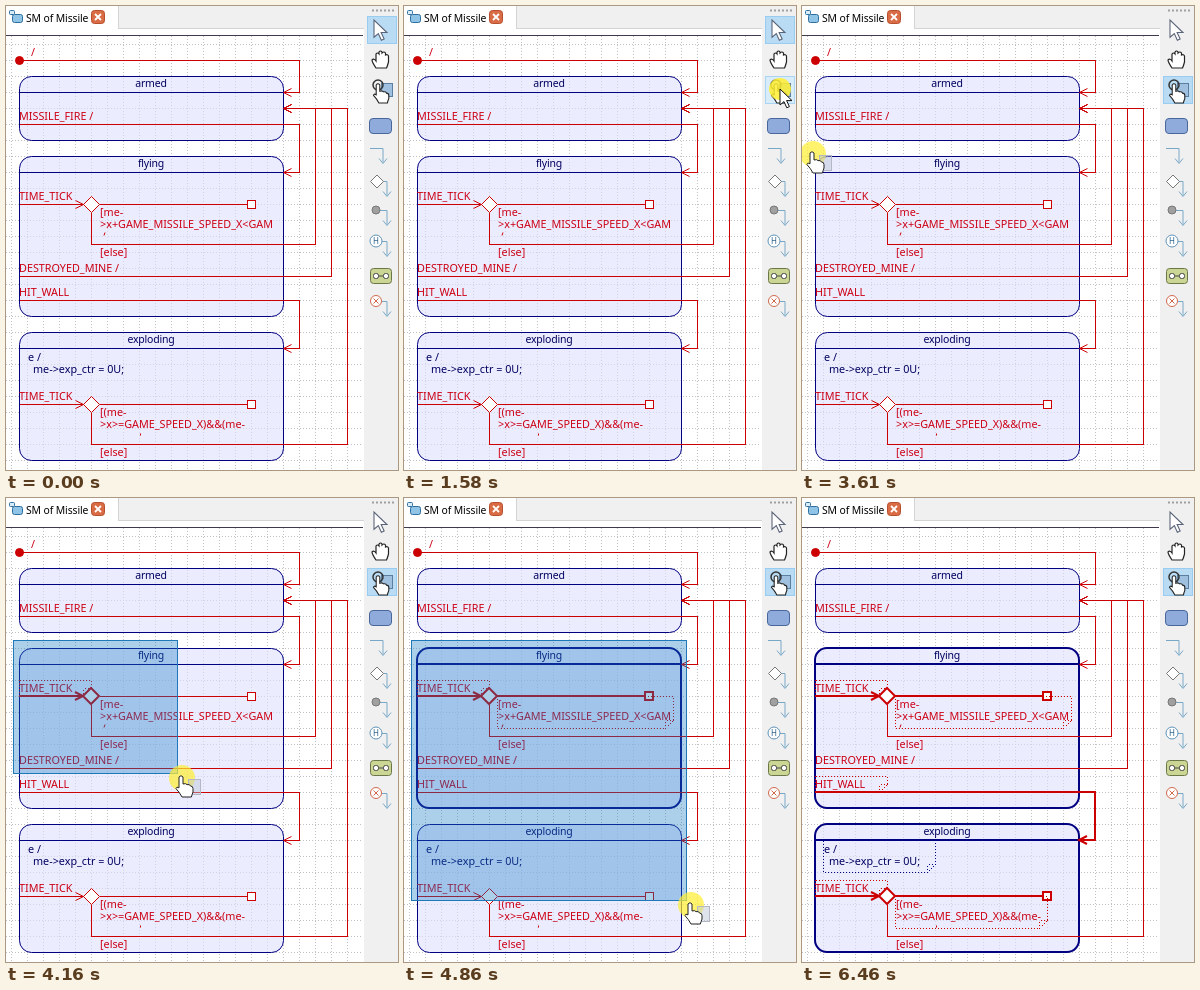
Animation, 392 px wide and 464 px high, one loop 7450 ms. Source, as an HTML page:

```html
<!DOCTYPE html>
<html lang="en">
<head>
<meta charset="utf-8">
<title>State machine selection</title>
<style>
html, body { margin: 0; width: 100%; height: 100%; overflow: hidden; background: #fff; }
svg { display: block; }
text { font: 10.8px "Noto Sans", "Open Sans", sans-serif; stroke: none; white-space: pre; }
.red { stroke: #cc0000; fill: none; }
.red text { fill: #cc0014; }
.navy { stroke: #000080; fill: none; }
.navy text { fill: #000060; }
.name { font-size: 10.5px; letter-spacing: -.2px; text-anchor: middle; }
.title { font-size: 10.4px; letter-spacing: -.1px; }
.line { shape-rendering: crispEdges; }
.box { visibility: hidden; stroke-width: 1; stroke-dasharray: 1 2; shape-rendering: crispEdges; }
.sel { stroke-width: 2; }
.sel > :not(text):not(.box) { transform: translate(-.5px, -.5px); }
.sel .box { visibility: visible; }
.button { fill: none; stroke: none; }
.button.hover { fill: #d8ecf9; stroke: #a9d4f2; }
.button.on { fill: #b9dcf4; stroke: #98ccf0; }
</style>
</head>
<body>
<svg id="stage" width="392" height="464" viewBox="0 0 392 464"></svg>
<script>
const LOOP = 7450;
const MARQUEE = { x: 7, y: 142 };
const BUTTON_Y = [24, 54, 84, 119, 150, 180, 209, 238, 270, 299];
const HAND = "M-2 0q2-2.6 4 0v7q3-1 4 .6q3-.6 3.4 1.4q2.6 0 2.6 2.6v3.4q-1 2.6-1.6 5h-9.4q-2.4-4.6-6-8.4q.4-2.4 3-.8z";
const ARROW = "M0 0V16L4 12.6L6.8 18.8L9.4 17.6L6.6 11.6H12Z";

const clamp = (v, lo, hi) => Math.max(lo, Math.min(hi, v));
const mix = (a, b, p) => a + (b - a) * p;
const text = (x, y, s, cls = "") =>
  `<text x="${x - .5}" y="${y - 1}" class="${cls}">${s.replace(/&/g, "&amp;").replace(/</g, "&lt;")}</text>`;
const path = (d, cls = "") => `<path d="${d}" class="${cls}"/>`;

// dotted frame with a folded corner, shown around the text of a selected part
const note = (x, y, w, h) =>
  path(`M${x} ${y}h${w}v${h - 8}l-8 8H${x}zm${w - 8} ${h}v-8h8`, "box");

// top, right and bottom are the edges the marquee must enclose to select the part
const part = (cls, top, right, bottom, body) =>
  `<g class="${cls}" data-top="${top}" data-right="${right}" data-bottom="${bottom}">${body}</g>`;

const headLeft = (x, y) => path(`M${x + 8} ${y - 4}L${x} ${y}L${x + 8} ${y + 4}`);
const headRight = (x, y) => path(`M${x - 8} ${y - 4}L${x} ${y}L${x - 8} ${y + 4}`);

function state(y, h, name, extra = "") {
  return part("navy", y, 277, y + h,
    `<rect x="13" y="${y}" width="264" height="${h}" rx="12" fill="#e0e0ff" fill-opacity=".6"/>` +
    path(`M13 ${y + 16}H277`, "line") + text(145, y + 11, name, "name") + extra);
}

// a line from the left edge out to a column, then into a state
function transition(y, column, target, name, extra = "") {
  return part("red", Math.min(y, target), column, Math.max(y, target),
    path(`M13 ${y}H${column}V${target}H277`, "line") + headLeft(277, target) +
    text(13, y - 4, name) + extra);
}

function tick(y, column, guard, guardWidth) {
  return part("red", 102, column, y + 40,
      path(`M85 ${y + 8}V${y + 40}H${column}V102H277`, "line") + headLeft(277, 102) +
      text(94, y + 52, "[else]")) +
    part("red", y, 85, y + 10, path(`M13 ${y}H77`, "line") + headRight(77, y) +
      text(13, y - 4, "TIME_TICK") + note(13, y - 16, 72, 16)) +
    part("red", y, 93 + guardWidth, y + 32, path(`M93 ${y}H241`, "line") +
      `<rect x="241" y="${y - 4}" width="8" height="8" fill="#fff" class="line"/>` +
      text(94, y + 12, guard[0]) + text(94, y + 24, guard[1]) + note(93, y, guardWidth, 32)) +
    part("red", y, 93, y + 8, `<path d="M85 ${y - 8}l8 8l-8 8l-8-8z" fill="#fff"/>`);
}

function diagram() {
  return `<g transform="translate(.5 .5)">` +
    state(70, 64, "armed") + state(150, 160, "flying") +
    state(326, 128, "exploding",
      text(22, 355, "e /") + text(27, 367, "me->exp_ctr = 0U;") + note(21, 342, 112, 32)) +
    `<g class="red"><circle cx="13" cy="54" r="4" fill="#cc0000"/>` +
    path("M13 54H293V86H277", "line") + headLeft(277, 86) + text(25, 50, "/") + `</g>` +
    transition(118, 293, 166, "MISSILE_FIRE /") +
    transition(270, 325, 102, "DESTROYED_MINE /") +
    transition(294, 293, 342, "HIT_WALL", note(13, 278, 72, 16)) +
    tick(198, 309, ["[me-", ">x+GAME_MISSILE_SPEED_X<GAM"], 176) +
    tick(398, 341, ["[(me-", ">x>=GAME_SPEED_X)&&(me-"], 152) +
    path("M98.500 226l-1 3M134 427v2", "red") + `</g>`;
}

function grid() {
  let d = "";
  for (let x = 5.5; x < 357; x += 16) d += `M${x} 30V464`;
  for (let y = 38.5; y < 464; y += 16) d += `M0 ${y}H357`;
  return `<path d="${d}" stroke="#c0c0c4" stroke-dasharray="1 2" class="line"/>`;
}

function tab() {
  return `<rect width="358" height="23" fill="#f0f0f0"/>
    <rect width="113" height="25" fill="#fff"/>
    <path d="M112.500 0V22.500H358" fill="none" stroke="#d4d4d4" class="line"/>
    <path d="M0 29.500H357" stroke="#40384c" class="line"/>
    <g stroke="#2f6f9f" fill="#8fc4e6"><rect x="6.500" y="8.500" width="10" height="8" rx="2"/>
    <rect x="3.500" y="4.500" width="5" height="4" rx="1" fill="#d9edf8"/></g>` +
    text(20.5, 17, "SM of Missile", "title") +
    `<rect x="85.500" y="4.500" width="13" height="13" rx="3" fill="#d96c45" stroke="#b64f2d"/>
    <path d="M89 8l6 6m0-6l-6 6" stroke="#fff" stroke-width="1.800"/>`;
}

function toolbar() {
  const buttons = BUTTON_Y.map(y =>
    `<rect x="361.500" y="${y - 13.5}" width="29" height="27" class="button"/>`).join("");
  const bend = (x, y, w) => path(`M${x} ${y}h${w}v14m-4-4l4 5l4-5`);
  return `<rect x="358" width="34" height="464" fill="#f0f0f0"/>
    <path d="M366 4.500H390" stroke="#a0a0a0" stroke-width="2" stroke-dasharray="2 2"/>${buttons}
    <path d="${ARROW}" transform="translate(368 14) scale(1.080)" fill="#fff" stroke="#5a6478"/>
    <path d="M370 62q-4-6-4-8q2-2 4 1v-7q1.500-2 3 0v-2q1.500-2 3 0v1q2-2 3.500 0v2q2-1 3 1v6q-1 4-2 6z" fill="#fff" stroke="#222" stroke-width="1.200"/>
    <rect x="375.500" y="77.500" width="11" height="13" fill="#9fc1df" stroke="#5c7f9f"/>
    <circle cx="372" cy="79" r="5" fill="none" stroke="#333" stroke-width="1.500"/>
    <path d="${HAND}" transform="translate(372 79) scale(.9)" fill="#fff" stroke="#222" stroke-width="1.200"/>
    <rect x="363.500" y="112.500" width="22" height="15" rx="3.500" fill="#8fabdc" stroke="#4a679c"/>
    <g fill="none" stroke="#78a8c8">
      ${bend(364, 142.5, 13)}${bend(377, 175.5, 4)}${bend(374, 204.5, 7)}${bend(376, 235.5, 5)}${bend(376, 295.5, 5)}</g>
    <path d="M371 169l6.500 6.500l-6.500 6.500l-6.500-6.500z" fill="#fff" stroke="#777"/>
    <circle cx="370" cy="204" r="4" fill="#a0a0a0" stroke="#777"/>
    <circle cx="370" cy="235" r="6" fill="#fff" stroke="#5f93b8"/>
    <text x="370" y="238" style="font-size:8px;text-anchor:middle" fill="#2b5f88">H</text>
    <rect x="364.500" y="262.500" width="21" height="15" rx="3" fill="#cbd694" stroke="#6a7748"/>
    <path d="M372 270h6" stroke="#444"/>
    <g fill="#fff" stroke="#444"><rect x="367.500" y="267.500" width="5" height="5" rx="2"/>
      <rect x="377.500" y="267.500" width="5" height="5" rx="2"/></g>
    <circle cx="370" cy="295" r="5.500" fill="#fff" stroke="#d0694c"/>
    <path d="M367.500 292.500l5 5m0-5l-5 5" stroke="#d0694c"/>`;
}

const stage = document.getElementById("stage");
stage.innerHTML = `<rect width="392" height="464" fill="#fff"/>` +
  grid() + diagram() + tab() + toolbar() +
  `<rect id="marquee" x="7.500" y="142.500" fill="#1478c3" fill-opacity=".35" stroke="#1f78b8"/>
  <g id="pointer"><circle id="glow" fill="#ffee30"/>
    <path id="arrow" d="${ARROW}" fill="#fff" stroke="#111"/>
    <g id="hand"><rect x="6.500" y="1.500" width="12" height="15" fill="#b8c4d4" fill-opacity=".45" stroke="#b4b8c4"/>
      <path d="${HAND}" transform="translate(-1 -1)" fill="#fff" stroke="#222"/></g></g>`;

const [marquee, pointer, glow, arrow, hand] =
  ["marquee", "pointer", "glow", "arrow", "hand"].map(id => document.getElementById(id));
const parts = [...stage.querySelectorAll("[data-right]")];
const buttons = [...stage.querySelectorAll(".button")];

// number of discrete steps taken at time t
const steps = (t, first, last, n) =>
  clamp(Math.floor((t - first + 2) * (n - 1) / (last - first)) + 1, 0, n);
const easeOut = p => 1 - (1 - p) ** 3;

// smooth curve through a few points
function curve(x, xs, ys) {
  return ys.reduce((sum, y, i) =>
    sum + xs.reduce((v, xj, j) => j === i ? v : v * (x - xj) / (xs[i] - xj), y), 0);
}

function pointerAt(t, corner) {
  if (t < 1910) {
    const p = easeOut(steps(t, 70, 1380, 20) / 20);
    return [mix(373, 376, p), mix(478, 83, p)];
  }
  if (t < 3680) {
    const p = easeOut(steps(t, 1910, 3210, 20) / 20);
    return [mix(376, 11, p), mix(83, 148, p)];
  }
  return [corner.x + 5, corner.y + 5];
}

function glowAt(t) {
  const click = [1580, 3480].map(s => t - s).find(d => d >= 0 && d < 130);
  if (click === undefined) return [13, .7];
  return click < 65 ? [11, .85] : [17, .5];
}

const enclosed = ({ top, right, bottom }, corner) =>
  +top >= MARQUEE.y && +right < corner.x && +bottom < corner.y;

function render(t) {
  const k = steps(t, 3680, 5600, 29), keys = [0, 8, 18, 29];
  const corner = {
    x: curve(k, keys, [MARQUEE.x, 171, 282, 317]),
    y: curve(k, keys, [MARQUEE.y, 275, 402, 472])
  };
  const [x, y] = pointerAt(t, corner);

  for (const g of parts) g.classList.toggle("sel", enclosed(g.dataset, corner));

  marquee.style.display = k > 0 && t < 6460 ? "" : "none";
  marquee.setAttribute("width", Math.round(corner.x - MARQUEE.x));
  marquee.setAttribute("height", Math.round(corner.y - MARQUEE.y));

  const active = t < 1640 ? 0 : 2;
  buttons.forEach((b, i) => {
    b.classList.toggle("on", i === active);
    b.classList.toggle("hover", t >= 70 && x > 360 && Math.abs(y - BUTTON_Y[i]) < 14);
  });

  const [r, alpha] = glowAt(t), overTools = x > 357;
  pointer.style.display = t >= 70 && t < 6460 ? "" : "none";
  pointer.setAttribute("transform", `translate(${Math.round(x)} ${Math.round(y)})`);
  glow.setAttribute("r", r);
  glow.setAttribute("fill-opacity", alpha);
  arrow.style.display = overTools ? "" : "none";
  hand.style.display = overTools ? "none" : "";
}

const start = performance.now();
function frame() {
  render((performance.now() - start) % LOOP);
  requestAnimationFrame(frame);
}
render(0);
requestAnimationFrame(frame);
</script>
</body>
</html>
```
